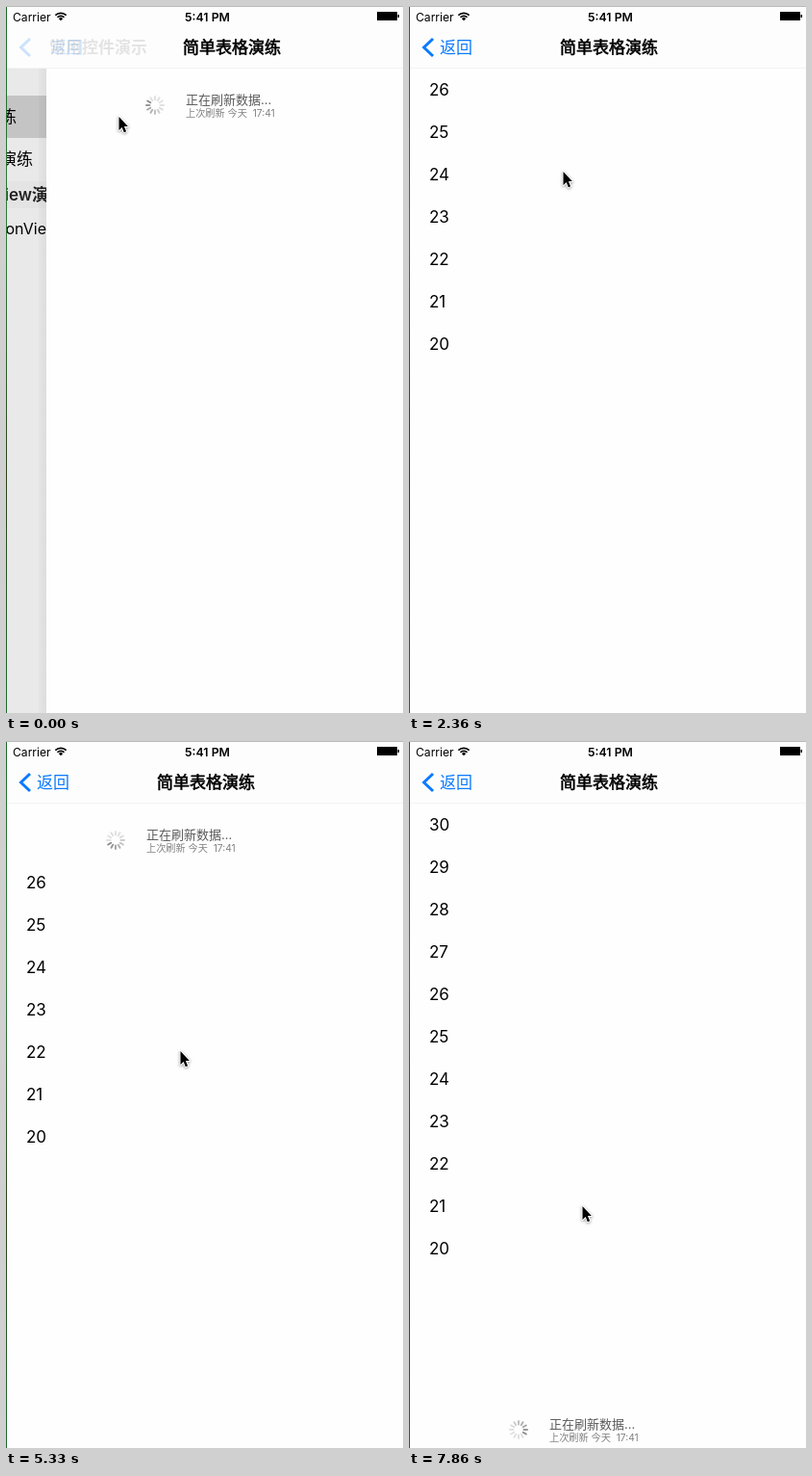
Animation of 413x734 px, one loop 8 s. Source, as an HTML page with a canvas:

```html
<!DOCTYPE html>
<html lang="zh-CN">
<head>
<meta charset="utf-8">
<style>
html, body { margin: 0; width: 100%; height: 100%; overflow: hidden; background: #fff; }
canvas { display: block; width: 413px; height: 734px; }
</style>
</head>
<body>
<canvas id="stage" width="413" height="734"></canvas>
<script>
const W = 413, H = 734, LOOP = 8000, STEP = 148.3, NAV = 65, ROW = 44, REFRESH = 60;
const FIRST_LOAD = 1700, SECOND_LOAD = 5690;
const BLUE = '#0a7aff', PAPER = '#fefefe';
const FONT = 'Inter, "Noto Sans CJK SC", "Noto Sans CJK", sans-serif';
const ARROW = new Path2D('M0 0V14L3.2 11L5.3 16.2L7.6 15.2L5.4 10H9.4Z');
const g = document.getElementById('stage').getContext('2d');

// Smooth step from 0 to 1 between two times.
function ramp(t, from, to) {
  const u = Math.min(1, Math.max(0, (t - from) / (to - from)));
  return u * u * (3 - 2 * u);
}

// Pull to refresh, settle, reload, then push up and spring back.
function scrollOffset(t) {
  return REFRESH * (1 - ramp(t, FIRST_LOAD, FIRST_LOAD + 400))
    + (REFRESH + 10) * ramp(t, 2500, 3300) - 10 * ramp(t, 3400, 3830)
    - REFRESH * ramp(t, SECOND_LOAD, SECOND_LOAD + 400)
    - 62 * (ramp(t, 6300, 6700) - ramp(t, 6700, 7335));
}

function pointerPosition(t) {
  let x = 117, y = 115;
  const move = (from, to, toX, toY) => {
    const k = ramp(t, from, to);
    x += (toX - x) * k;
    y += (toY - y) * k;
  };
  move(1300, 2200, 160, 172);
  move(2500, 3350, 190, 317);
  move(3710, 4700, 181, 322);
  move(6250, 6800, 198, 175);
  move(6980, 7700, 180, 483);
  return [x, y];
}

function barOpacity(t) {
  const flash = (from, to) => ramp(t, from, from + 140) - ramp(t, to, to + 300);
  return flash(440, 1400) + flash(2500, 3350) + flash(6250, 7100);
}

function rect(x, y, w, h, color) {
  g.fillStyle = color;
  g.fillRect(x, y, w, h);
}

function text(str, x, y, size, color = '#000', weight = 400, align = 'left') {
  g.font = `${weight} ${size}px ${FONT}`;
  g.textAlign = align;
  g.fillStyle = color;
  g.fillText(str, x, y);
}

// A thin outline gives a weight between regular and bold.
function heading(str, x) {
  text(str, x, 49, 17, '#000', 400, 'center');
  g.strokeStyle = '#000';
  g.lineWidth = 0.6;
  g.strokeText(str, x, 49);
}

function gradient(x0, y0, x1, y1, ...colors) {
  const fill = g.createLinearGradient(x0, y0, x1, y1);
  colors.forEach((color, i) => fill.addColorStop(i / (colors.length - 1), color));
  return fill;
}

function spinner(x, y, turn) {
  const head = Math.floor(turn * 12);
  g.lineWidth = 2;
  g.lineCap = 'round';
  for (let i = 0; i < 12; i++) {
    const age = (head - i + 12) % 12, angle = i * Math.PI / 6;
    const shade = Math.min(224, 140 + age * 13);
    const dx = Math.sin(angle), dy = -Math.cos(angle);
    g.strokeStyle = `rgb(${shade},${shade},${shade})`;
    g.beginPath();
    g.moveTo(x + 5.5 * dx, y + 5.5 * dy);
    g.lineTo(x + 9 * dx, y + 9 * dy);
    g.stroke();
  }
}

function refreshLabel(y, turn) {
  spinner(114, y + 6, turn % 1);
  text('正在刷新数据...', 146, y + 5, 13, '#5a5a5a');
  text('上次刷新 今天  17:41', 146, y + 18, 10.2, '#808080');
}

function previousPage(dx) {
  rect(0, NAV, 60, H, '#e9e9e9');
  rect(0, 93, 60, 44, '#c4c4c4');
  rect(0, 182, 60, 28, '#e4e4e4');
  text('演练', 11 + dx, 121, 17, '#000', 400, 'right');
  text('表格演练', 28 + dx, 165, 17, '#000', 400, 'right');
  text('UIScrollView演练', 61 + dx, 202, 17, '#222', 600, 'right');
  text('UICollectionVie', 42 + dx, 237, 16, '#000', 400, 'right');
}

function table(t, offset) {
  const rows = t < FIRST_LOAD ? 0 : t < SECOND_LOAD ? 7 : 11;
  const resting = Math.abs(offset) < 0.5 || Math.abs(offset - REFRESH) < 0.5;
  if (rows && !resting) {
    for (let y = Math.round(offset) + NAV + 43; y < H; y += ROW) rect(21, y, W, 1, '#c8c7cc');
  }
  for (let i = 0; i < rows; i++) text(19 + rows - i, 21, 93 + offset + i * ROW, 17);
  if (offset > 0) refreshLabel(37 + offset, t / 1000 + (t < 2300 ? 0.9 : 0.4));
  if (rows === 11) refreshLabel(709 + offset, t / 1000 + 0.53);

  g.globalAlpha = barOpacity(t);
  const top = 68 + Math.max(0, -2 * offset), bottom = 733 - Math.max(0, 1.35 * offset);
  rect(410, top, 2, bottom - top, '#b2b2b2');
  g.globalAlpha = 1;
}

function navigation(slide) {
  const p = slide / 41;
  rect(0, 0, W, NAV, '#fdfdfd');
  rect(0, 64, W, 1, '#f3f3f3');
  rect(0, 0, W, 1, '#b9b9b9');

  g.globalAlpha = p * 0.1;
  text('常用控件演示', 33 + p * 12, 49, 17, '#000', 700);

  g.globalAlpha = 1 - 0.8 * p;
  g.strokeStyle = BLUE;
  g.lineWidth = 3;
  g.lineCap = 'butt';
  g.beginPath();
  g.moveTo(25, 34);
  g.lineTo(15.5, 43);
  g.lineTo(25, 52);
  g.stroke();
  text('返回', 32 + p * 14, 49, 17, BLUE);
  g.globalAlpha = 1;
  heading('简单表格演练', 208 + p * 27);
}

function statusBar() {
  text('Carrier', 7, 16, 12.1);
  text('5:41 PM', 209.5, 16, 12.3, '#000', 600, 'center');
  g.strokeStyle = '#000';
  g.lineCap = 'butt';
  g.lineWidth = 1.7;
  const arc = r => g.arc(57, 15.3, r, -Math.PI * 0.75, -Math.PI * 0.25);
  for (const r of [5, 8]) {
    g.beginPath();
    arc(r);
    g.stroke();
  }
  g.beginPath();
  g.moveTo(57, 15.3);
  arc(3);
  g.fill();
  rect(386, 6, 21, 9, '#000');
  rect(407.5, 9, 1.5, 3, '#000');
}

function pointer(x, y) {
  g.save();
  g.translate(x + 0.5, y);
  g.shadowColor = 'rgba(0,0,0,.4)';
  g.shadowBlur = 3;
  g.shadowOffsetY = 1;
  g.lineWidth = 2;
  g.lineJoin = 'round';
  g.strokeStyle = '#fff';
  g.stroke(ARROW);
  g.shadowColor = 'transparent';
  g.fillStyle = '#000';
  g.fill(ARROW);
  g.restore();
}

function draw(t) {
  const slide = t < 560 ? 41 * Math.exp(-t / 125) : 0;
  rect(0, 0, W, H, PAPER);
  if (slide > 0.5) {
    previousPage((slide - 41) * 0.3);
    rect(slide - 7, NAV, 8, H, gradient(slide - 7, 0, slide + 1, 0, 'rgba(0,0,0,.02)', 'rgba(0,0,0,.05)'));
    rect(slide + 1, NAV, W, H, PAPER);
  }
  g.save();
  g.translate(Math.round(slide), 0);
  table(t, scrollOffset(t));
  g.restore();
  navigation(slide);
  statusBar();
  rect(0, 1, 1, H, gradient(0, 0, 0, H, '#1c6b2b', '#2f7a3c', '#2a3f1c', '#1d6a30'));
  pointer(...pointerPosition(t));
}

// Time advances in even steps, each held until the next.
function tick() {
  const t = performance.now() % LOOP;
  draw(Math.min(53, Math.floor((t + 20) / STEP)) * STEP);
  requestAnimationFrame(tick);
}
tick();
</script>
</body>
</html>
```
